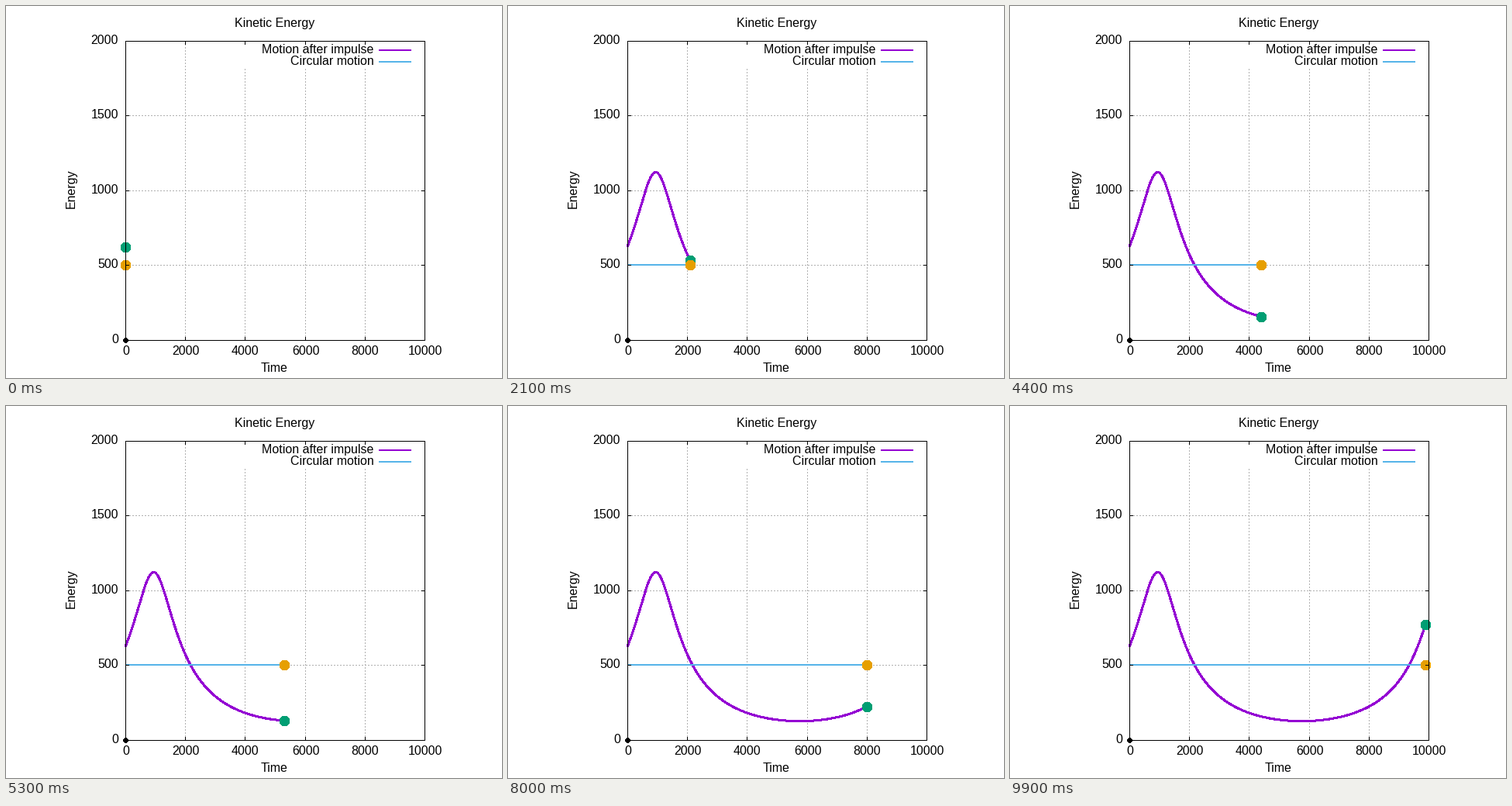
Write a matplotlib script that moves like this. It is 640x480 px and loops after 10000 ms.

```python
import numpy as np
import matplotlib.pyplot as plt
from matplotlib.animation import FuncAnimation
from matplotlib.patches import Circle

DPI = 80
PX = 72 / DPI                       # one pixel in points
LEFT, RIGHT, TOP, BOTTOM = 154.5, 540.5, 45.5, 431.5
PURPLE, GREEN, BLUE, ORANGE = "#9400d3", "#009e73", "#56b4e9", "#e69f00"

plt.rcParams["font.family"] = "Liberation Sans"
plt.rcParams["font.size"] = 16 * PX

fig = plt.figure(figsize=(640 / DPI, 480 / DPI), dpi=DPI, facecolor="white")
ax = fig.add_axes([0, 0, 1, 1])
ax.set_xlim(0, 640)
ax.set_ylim(480, 0)
ax.axis("off")


def to_x(t):
    return LEFT + (RIGHT - LEFT) * t / 10000


def to_y(energy):
    return BOTTOM - (BOTTOM - TOP) * energy / 2000


def pixel(x, y):
    """Centre of the pixel that holds a point."""
    return np.floor(x) + 0.5, np.ceil(y) - 0.5


def line(xs, ys, color="black", width=1, z=5, **kw):
    return ax.plot(xs, ys, color=color, lw=width * PX, zorder=z, snap=False,
                   solid_capstyle="butt", **kw)[0]


def label(x, y, text, ha="center", **kw):
    ax.text(x, y, text, ha=ha, va="baseline", zorder=6, **kw)


def dot(color, radius, z):
    return ax.add_patch(Circle((LEFT, BOTTOM), radius, fc=color, ec="none",
                               lw=0, zorder=z, antialiased=False))


def kinetic(t, e=0.498, energy=500, unit=1000):
    """Kepler orbit after a radial kick of e times the circular speed."""
    a = 1 / (1 - e * e)
    start = np.arccos(e)
    mean = t / unit / a ** 1.5 - (start - e * np.sin(start))
    ecc = mean + e * np.sin(mean)
    for _ in range(12):
        ecc -= (ecc - e * np.sin(ecc) - mean) / (1 - e * np.cos(ecc))
    return energy * (2 / (a * (1 - e * np.cos(ecc))) - 1 / a)


# Frame, grid, ticks and numbers
for x in (LEFT, RIGHT):
    line([x, x], [TOP - 0.5, BOTTOM + 0.5])
for y in (TOP, BOTTOM):
    line([LEFT - 0.5, RIGHT + 0.5], [y, y])

grid = dict(color="#b0b0b0", z=1, dashes=(2, 2), dash_capstyle="butt")
for t in range(0, 10001, 2000):
    x, _ = pixel(to_x(t), 0)
    if 0 < t < 10000:
        top = 81 if t > 2000 else TOP       # the key hides the upper part
        line([x, x], [BOTTOM - 0.5, top], **grid)
        line([x, x], [BOTTOM - 4.5, BOTTOM])
        line([x, x], [TOP, TOP + 4.5])
    label(x, 450, str(t))
for energy in range(0, 2001, 500):
    _, y = pixel(0, to_y(energy))
    if 0 < energy < 2000:
        line([LEFT + 0.5, RIGHT], [y, y], **grid)
        line([LEFT, LEFT + 4.5], [y, y])
        line([RIGHT - 4.5, RIGHT], [y, y])
    label(145, y + 3.5, str(energy), ha="right")

label(346.5, 27, "Kinetic Energy")
label(346.5, 472, "Time")
label(89, 236, "Energy", rotation=90, rotation_mode="anchor")

# Key
for y, name, color in ((57, "Motion after impulse", PURPLE),
                       (72, "Circular motion", BLUE)):
    label(474.5, y + 4, name, ha="right")
    line([481, 523], [y, y], color, 2)

# Moving parts
times = np.arange(0, 10001, 10)
xs, ys = to_x(times), to_y(kinetic(times))
level = pixel(0, to_y(500))[1]
impulse = line([], [], PURPLE, 2, 2, antialiased=False)
impulse_dot = dot(GREEN, 6.2, 2.1)
circular = line([], [], BLUE, 2, 2.2)
circular_dot = dot(ORANGE, 6.2, 2.3)
dot("black", 2.6, 6)


def update(i):
    n = 10 * i
    # two-pixel strokes sit half a pixel up and left of their points
    impulse.set_data(xs[:n + 1] - 0.5, ys[:n + 1] - 0.5)
    circular.set_data([xs[0] - 0.5, xs[n]], [level - 0.5] * 2)
    impulse_dot.center = pixel(xs[n], ys[n])
    circular_dot.center = pixel(xs[n], level)
    return impulse, impulse_dot, circular, circular_dot


anim = FuncAnimation(fig, update, frames=100, interval=100, repeat=True,
                     repeat_delay=0, blit=False)
plt.show()
```
